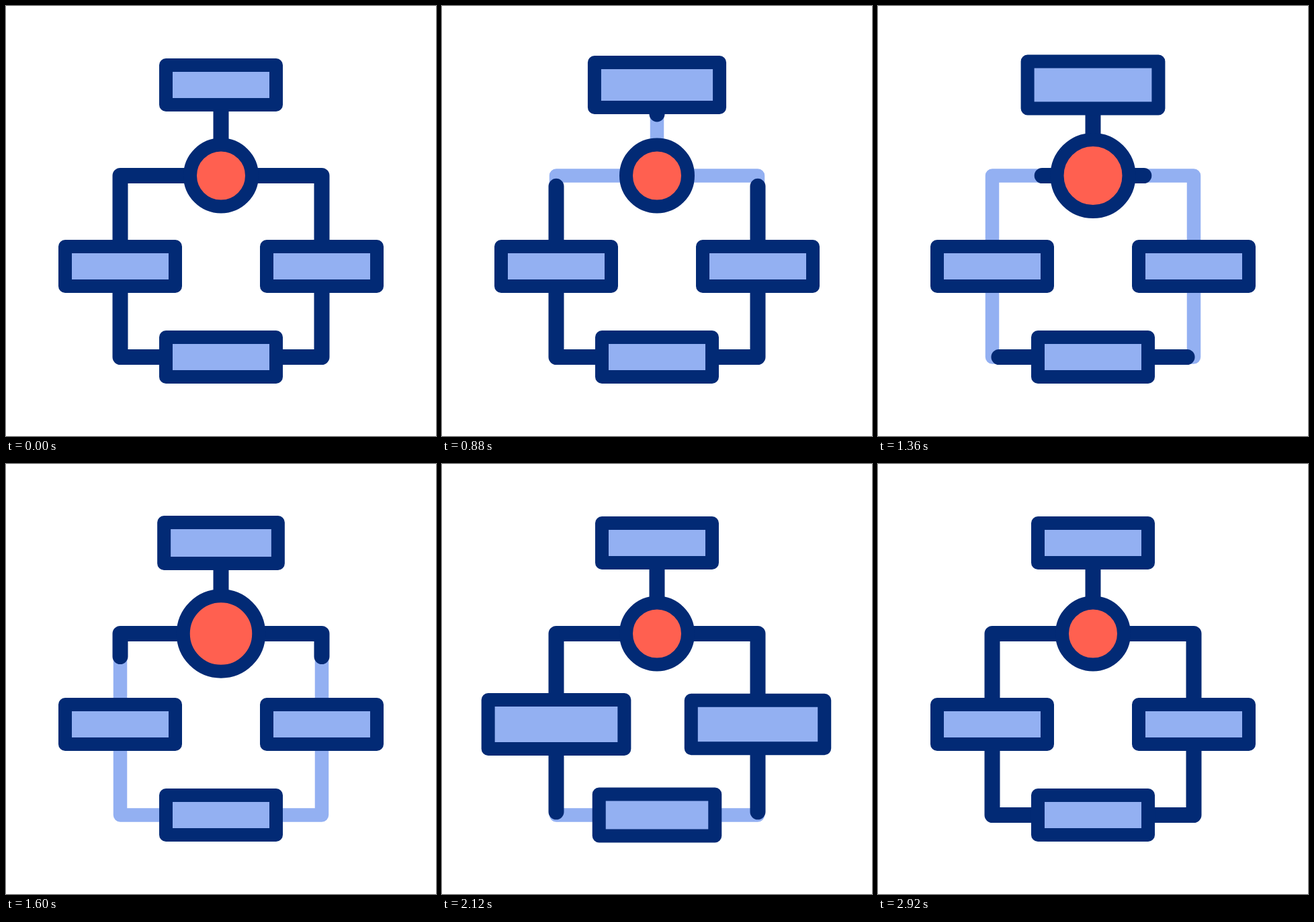
An HTML page with a canvas that plays this animation: 640 px wide and 640 px high, repeating every 3000 ms.

```html
<!DOCTYPE html>
<html lang="en">
<head>
<meta charset="utf-8">
<title>Flowchart loop</title>
<style>
  html, body { margin: 0; width: 100%; height: 100%; overflow: hidden; background: #fff; }
  canvas { display: block; width: 640px; height: 640px; }
</style>
</head>
<body>
<canvas id="stage" width="640" height="640"></canvas>
<script>
const ctx = document.getElementById('stage').getContext('2d');
const LOOP = 3000, STEP = 40;
const NAVY = '#022a75', SKY = '#93b0f2', CORAL = '#ff6050';

const CX = 320, SIDE = 150;
const TOP = 117.5, HUB = 252.5, MID = 387.5, BASE = 522.5;
const LENGTH = (HUB - TOP) + SIDE + (BASE - HUB) + SIDE;

// pulse: start, peak and end time in ms, then the added scale at the peak
const boxes = [
  { x: CX, y: TOP, pulse: [670, 1110, 1735, 0.29] },
  { x: CX - SIDE, y: MID, pulse: [1650, 2055, 2620, 0.245] },
  { x: CX + SIDE, y: MID, pulse: [1650, 2055, 2620, 0.218] },
  { x: CX, y: BASE, pulse: [1899, 2510, 2930, 0.175] }
];
const hubPulse = [1105, 1516, 2021, 0.24];

function ease(t, from, to) {
  const p = Math.min(1, Math.max(0, (t - from) / (to - from)));
  return p * p * (3 - 2 * p);
}

function pulseScale(t, [start, peak, end, amount]) {
  return 1 + amount * (ease(t, start, peak) - ease(t, peak, end));
}

function strokeLinks(color, width, from = 0, to = LENGTH) {
  if (to <= from) return;
  ctx.beginPath();
  for (const x of [CX - SIDE, CX + SIDE]) {
    ctx.moveTo(CX, TOP);
    ctx.lineTo(CX, HUB);
    ctx.lineTo(x, HUB);
    ctx.lineTo(x, BASE);
    ctx.lineTo(CX, BASE);
  }
  ctx.setLineDash([to - from, 2 * LENGTH]);
  ctx.lineDashOffset = -from;
  ctx.strokeStyle = color;
  ctx.lineWidth = width;
  ctx.stroke();
  ctx.setLineDash([]);
}

function paintShape(fill) {
  ctx.fillStyle = fill;
  ctx.strokeStyle = NAVY;
  ctx.lineWidth = 20;
  ctx.fill();
  ctx.stroke();
}

function draw(t) {
  ctx.fillStyle = '#fff';
  ctx.fillRect(0, 0, 640, 640);
  ctx.lineCap = ctx.lineJoin = 'round';

  strokeLinks(SKY, 20.5);
  strokeLinks(NAVY, 23, LENGTH * ease(t, 57, 1882), LENGTH);
  strokeLinks(NAVY, 23, 0, LENGTH * ease(t, 537, 2807));

  for (const { x, y, pulse } of boxes) {
    const s = pulseScale(t, pulse);
    ctx.beginPath();
    ctx.rect(x - 82 * s, y - 29.5 * s, 164 * s, 59 * s);
    paintShape(SKY);
  }

  ctx.beginPath();
  ctx.arc(CX, HUB, 46 * pulseScale(t, hubPulse), 0, 2 * Math.PI);
  paintShape(CORAL);
}

function tick() {
  const t = performance.now() % LOOP;
  draw(Math.floor(t / STEP) * STEP);
  requestAnimationFrame(tick);
}
tick();
</script>
</body>
</html>
```
